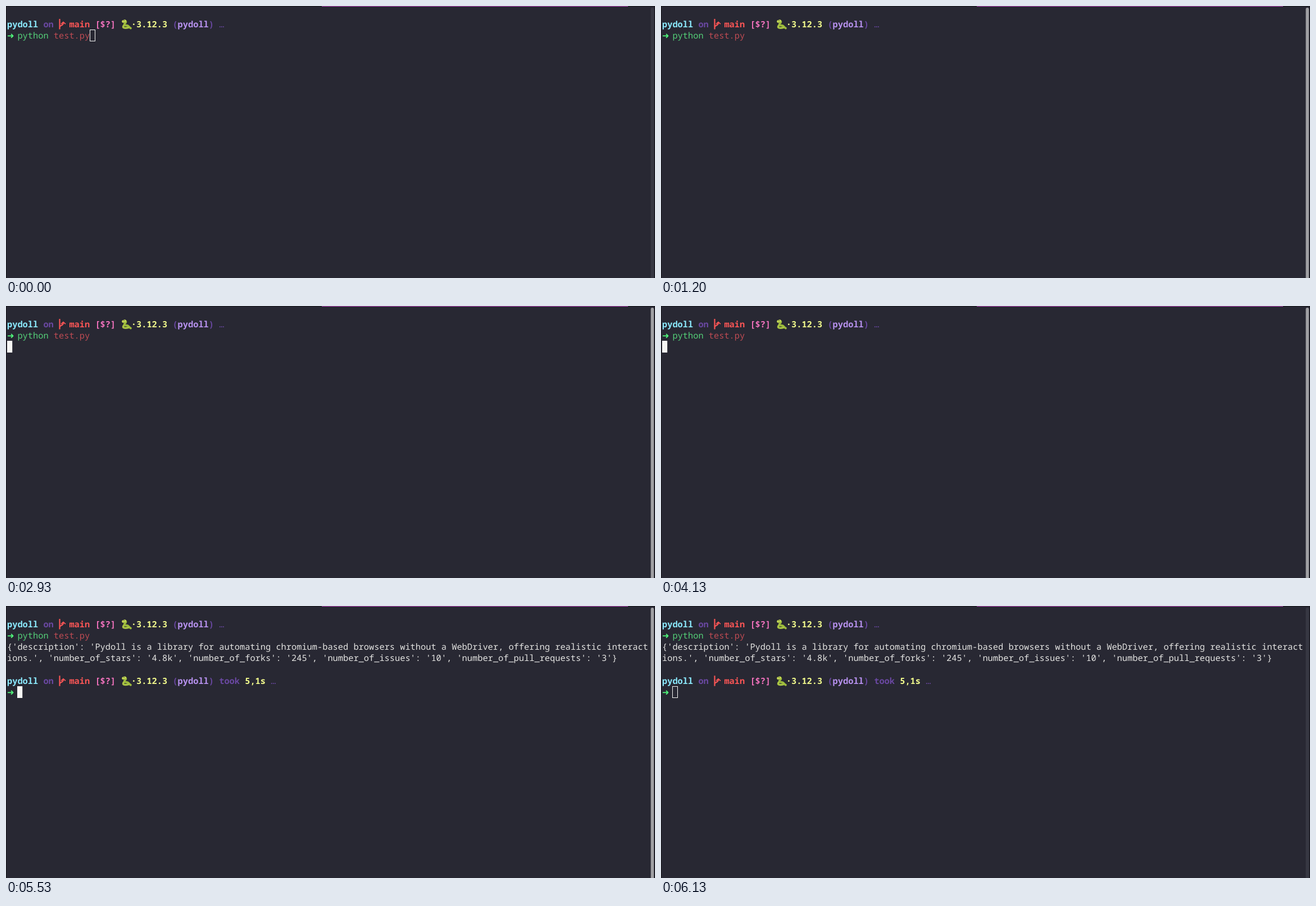
Recreate the animation shown at these times as an HTML page with a canvas. Size 1155 by 485 pixels, loop 6.2 s.

```html
<!DOCTYPE html>
<html lang="en">
<head>
<meta charset="utf-8">
<title>Terminal</title>
<style>
  html, body { margin: 0; height: 100%; overflow: hidden; background: #282833; }
  canvas { display: block; }
</style>
</head>
<body>
<canvas id="stage" width="1155" height="485"></canvas>
<script>
const ctx = document.getElementById('stage').getContext('2d');
const LOOP = 6200, FOCUS = 70, ENTER = 530, DONE = 5530, BLUR = 5930, FADE = 200, BLINK = 600;
const CELL = 9.2, LINE = 20.25, LEFT = 2, TOP = 22.1;
const MONO = '15.33px "Noto Sans Mono", monospace';
const C = {
  back: '#282833', cyan: '#8be9fd', dim: '#6a48a2', red: '#f95555', pink: '#f573bf',
  yellow: '#f1fa8c', purple: '#b892f0', arrow: '#50fa7b', green: '#54cf78',
  darkRed: '#bd4b53', white: '#e4e4e2'
};
const OUTPUT = [
  "{'description': 'Pydoll is a library for automating chromium-based browsers without a WebDriver, offering realistic interact",
  "ions.', 'number_of_stars': '4.8k', 'number_of_forks': '245', 'number_of_issues': '10', 'number_of_pull_requests': '3'}"
];
const colX = col => LEFT + col * CELL;
const rowY = row => TOP + row * LINE;
const baseline = row => Math.round(rowY(row) + 15.4);

// Every character sits in its own terminal cell.
function write(text, col, row, color, bold) {
  ctx.font = (bold ? 'bold ' : '') + MONO;
  ctx.fillStyle = color;
  [...text].forEach((ch, i) => ctx.fillText(ch, colX(col + i), baseline(row)));
}

function at(col, row, draw) {
  ctx.save();
  ctx.translate(colX(col), rowY(row));
  draw();
  ctx.restore();
}

function line(path, color, width) {
  ctx.strokeStyle = color;
  ctx.lineWidth = width;
  ctx.stroke(new Path2D(path));
}

function branch() {
  line('M1.5 1V19.5M1.5 15.5C2 11.5 8 14 8 7.5', C.red, 2.2);
  line('M4 10L8 6.5L12 10', C.red, 1.8);
}

function snake() {
  ctx.lineCap = ctx.lineJoin = 'round';
  line('M4.5 5C9 3 10 6 7.5 8.5C5 11 7 13 10 12.5C14 12 14 16 17.5 17.5', '#9dbb3b', 3.8);
  line('M5 13C2 17 7 18 13 16.5', '#a9c444', 3.6);
  line('M4 5.5L7 4.5', '#c4d856', 4.6);
  ctx.fillStyle = '#39451f';
  ctx.fillRect(5, 3.5, 1.3, 1.3);
}

function prompt(row, took) {
  write('pydoll', 0, row, C.cyan, true);
  write('on', 7, row, C.dim, true);
  at(10, row, branch);
  write('main', 12, row, C.red, true);
  write('[$?]', 17, row, C.pink, true);
  at(22, row, snake);
  write('·3.12.3', 24, row, C.yellow, true);
  write('(', 32, row, C.dim, true);
  write('pydoll', 33, row, C.purple, true);
  write(')', 39, row, C.dim, true);
  if (took) {
    write('took', 41, row, C.dim, true);
    write(took, 46, row, C.yellow, true);
  }
  write('…', took ? 51 : 41, row, C.dim);
  ctx.font = '15px "DejaVu Sans", sans-serif';
  ctx.fillStyle = C.arrow;
  ctx.fillText('➜', LEFT, baseline(row + 1));
}

function cursor(col, row, focused) {
  const x = Math.floor(colX(col)), y = Math.floor(rowY(row));
  ctx.fillStyle = ctx.strokeStyle = '#f6f6f4';
  ctx.lineWidth = 1;
  if (focused) ctx.fillRect(x, y, 9.2, 21);
  else ctx.strokeRect(x + .5, y + .5, 9, 20);
}

function windowFrame(focus) {
  ctx.fillStyle = '#15151b';
  ctx.fillRect(0, 0, 1155, 1);
  ctx.fillRect(0, 0, 1, 485);
  ctx.fillRect(1154, 0, 1, 485);
  ctx.fillStyle = '#b03fae';
  ctx.fillRect(562, 0, 545, 1);
  const mix = (a, b) => a + (b - a) * focus;
  ctx.fillStyle = `rgb(${mix(55, 160)}, ${mix(56, 160)}, ${mix(67, 164)})`;
  ctx.beginPath();
  ctx.roundRect(1147.5, 3, 5.5, 490, 2.7);
  ctx.fill();
}

function draw(t) {
  const ramp = start => Math.min(1, Math.max(0, (t - start) / FADE));
  const focused = t >= FOCUS && t < BLUR + FADE / 2;
  ctx.textRendering = 'geometricPrecision';
  ctx.fillStyle = C.back;
  ctx.fillRect(0, 0, 1155, 485);
  windowFrame(ramp(FOCUS) - ramp(BLUR));
  prompt(0);
  write('python', 2, 1, C.green);
  write('test.py', 9, 1, C.darkRed);
  if (t < ENTER) {
    cursor(16, 1, focused);
  } else if (t < DONE) {
    if (Math.floor((t - ENTER) / BLINK) % 2 === 0) cursor(0, 2, true);
  } else {
    OUTPUT.forEach((text, i) => write(text, 0, 2 + i, C.white));
    prompt(5, '5,1s');
    cursor(2, 6, focused);
  }
}

function tick() {
  draw(performance.now() % LOOP);
  requestAnimationFrame(tick);
}
tick();
</script>
</body>
</html>
```
